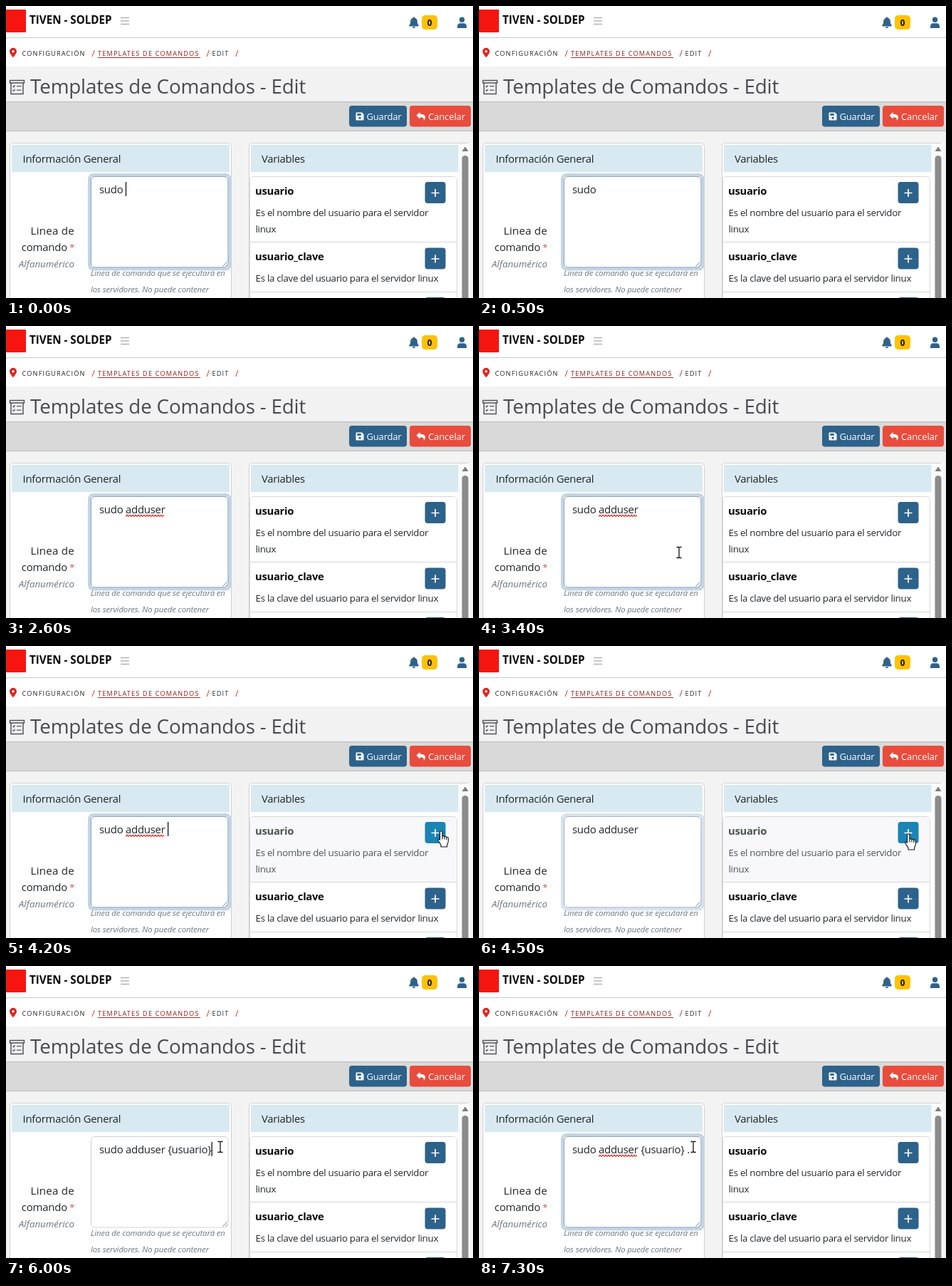
An HTML page for the animation above (8000 ms loop, 656 px wide and 410 px high).

```html
<!DOCTYPE html>
<html lang="es">
<head>
<meta charset="utf-8">
<title>Templates de Comandos</title>
<style>
  html, body { margin: 0; width: 100%; height: 100%; overflow: hidden; background: #f3f3f3; }
  svg { display: block; width: 656px; height: 410px; }
  text { font-family: "Open Sans", "Noto Sans", sans-serif; fill: #212529; white-space: pre; }
  .bold { font-weight: 700; fill: #0b0b0c; }
  .brand { font-size: 15.2px; }
  .crumb { font-size: 9.2px; letter-spacing: 1.15px; }
  .link { fill: #8c1d18; }
  .slash { font-size: 12px; fill: #d9301f; }
  .title { font-size: 27.8px; letter-spacing: -.2px; fill: #4a4a4f; }
  .btn { font-size: 13px; letter-spacing: -.18px; fill: #fff; }
  .head { font-size: 14.8px; letter-spacing: -.22px; }
  .name { font-size: 14.8px; letter-spacing: -.3px; }
  .desc { font-size: 13.3px; letter-spacing: -.27px; }
  .cmd { font-size: 15px; letter-spacing: -.3px; }
  .hint { font-size: 11.4px; letter-spacing: -.1px; font-style: italic; fill: #6c757d; }
  .end { text-anchor: end; }
  .hover text { fill: #4d5358; }
</style>
</head>
<body>
<svg viewBox="0 0 656 410">
  <defs>
    <g id="plus">
      <rect width="29" height="30" rx="4"/>
      <path d="M9 15.5h11M14.5 10v11" stroke="#fff" stroke-width="1.7"/>
    </g>
  </defs>

  <!-- top bar -->
  <rect width="656" height="85" fill="#fff"/>
  <path d="M0 44.5h656" stroke="#c9c9cb"/>
  <rect y="5" width="28" height="32" fill="#f5160f"/>
  <text class="bold brand" x="33" y="25">TIVEN - SOLDEP</text>
  <path d="M161 16.5h12M161 21h12M161 25.5h12" stroke="#b4b4b4" stroke-width="1.4"/>
  <g fill="#2d628b">
    <path d="M573 15.5c.8 0 1.2.5 1.2 1.2 2.2.5 3.6 2.300 3.600 4.800 0 3 .7 4.200 1.700 5.300.6.800.2 1.700-.700 1.700h-11.600c-.9 0-1.300-.9-.7-1.700 1-1.100 1.700-2.300 1.700-5.300 0-2.500 1.400-4.300 3.600-4.800 0-.7.4-1.200 1.200-1.200zM571 29.300h4a2 2 0 0 1-4 0z"/>
    <circle cx="640.500" cy="19.300" r="3.700"/>
    <path d="M634 31v-2.500c0-2.600 1.700-4.200 4.200-4.200h4.600c2.500 0 4.200 1.600 4.200 4.200V31z"/>
  </g>
  <rect x="584" y="13" width="22" height="20" rx="5" fill="#ffc107"/>
  <text class="bold" x="595" y="27.500" font-size="11.5" text-anchor="middle">0</text>

  <!-- breadcrumb -->
  <path d="M10 72.500C7 68.500 5 66.300 5 63.800a5 5 0 0 1 10 0c0 2.500-2 4.700-5 8.700z" fill="#e0261b"/>
  <circle cx="10" cy="63.800" r="1.700" fill="#fff"/>
  <text class="crumb" x="22.500" y="70">CONFIGURACIÓN</text>
  <text class="slash" x="120.500" y="71">/</text>
  <text class="crumb link" x="129" y="70">TEMPLATES DE COMANDOS</text>
  <path d="M129 72.500h144" stroke="#a8302a"/>
  <text class="slash" x="281.500" y="71">/</text>
  <text class="crumb" x="289.500" y="70">EDIT</text>
  <text class="slash" x="322" y="71">/</text>

  <!-- title -->
  <rect y="85" width="656" height="49" fill="#f2f2f3"/>
  <g fill="none" stroke="#55555a" stroke-width="1.500">
    <path d="M5.500 108v-3.500h20v3.500zM7 108v15.500h17V108"/>
    <path d="M9.500 112.500l1.200 1.200 2-2.400M9.500 118l1.200 1.200 2-2.400M15 112.700h6.500M15 118.200h6.500" stroke-width="1.300"/>
  </g>
  <text class="title" x="34" y="123">Templates de Comandos - Edit</text>

  <!-- toolbar -->
  <rect y="134" width="656" height="42" fill="#d9d9d9"/>
  <path d="M0 134.500h656M0 175.500h656" stroke="#bcbcbc"/>
  <rect x="482" y="140" width="81" height="29.500" rx="4" fill="#2d628b"/>
  <rect x="567" y="140" width="86" height="29.500" rx="4" fill="#e74c3c"/>
  <path d="M492.500 149.500h7.500l2.500 2.500v7.500a1 1 0 0 1-1 1h-9a1 1 0 0 1-1-1v-9a1 1 0 0 1 1-1z" fill="#fff"/>
  <path d="M493.300 151h5.500v2.800h-5.500z" fill="#2d628b"/>
  <circle cx="497" cy="157.200" r="1.600" fill="#2d628b"/>
  <text class="btn" x="506.500" y="160">Guardar</text>
  <path d="M576.500 153.500l5-4.500v2.700c4.500 0 7.500 1.200 7.500 4.800 0 1.800-1 3.300-2.300 4.300.8-3.300-.7-4.600-5.200-4.600v2.500z" fill="#fff"/>
  <text class="btn" x="593" y="160" style="letter-spacing:-.1px">Cancelar</text>

  <!-- left card -->
  <rect x="5.500" y="192.500" width="311" height="240" rx="5" fill="#fff" stroke="#cfcfd3"/>
  <rect x="8" y="195" width="306" height="38" fill="#d8e9f2"/>
  <text class="head" x="23.500" y="219.500">Información General</text>
  <text class="end" x="96" y="320.500" style="font-size:15.2px;letter-spacing:.2px">Linea de</text>
  <text class="end" x="86" y="343.500" style="font-size:15px;letter-spacing:-.25px">comando</text>
  <text class="end" x="96.500" y="344" style="font-size:13px;fill:#d9534f">*</text>
  <text class="hint end" x="96" y="367" style="font-size:13.300px;letter-spacing:0">Alfanumérico</text>
  <text class="hint" x="119" y="379">Linea de comando que se ejecutará en</text>
  <text class="hint" x="119" y="402">los servidores. No puede contener</text>

  <!-- text area -->
  <rect id="glow" x="117" y="237" width="197.500" height="132.500" rx="6" fill="none" stroke="#c3d5e5" stroke-width="4"/>
  <rect x="119.500" y="239.500" width="192.500" height="127.500" rx="5" fill="#fff" stroke="#cdd1d6"/>
  <rect id="rim" x="119.500" y="239.500" width="192.500" height="127.500" rx="5" fill="none" stroke="#8aa9c6"/>
  <path d="M304.500 365.500l6-6M308.500 365.500l2-2" stroke="#777" stroke-width=".9"/>
  <text class="cmd" id="cmd" x="131" y="263"></text>
  <path id="wave" fill="none" stroke="#e23b3b" stroke-width="1.100"/>
  <path id="caret" d="M0 247v20" stroke="#111" stroke-width="1.300"/>

  <!-- right card -->
  <path d="M341.500 410V197.500a5 5 0 0 1 5-5H651.500V410z" fill="#fff"/>
  <path d="M341.500 410V197.500a5 5 0 0 1 5-5H647a5 5 0 0 1 4.500 4" fill="none" stroke="#cfcfd3"/>
  <rect x="344" y="195" width="291.500" height="38" fill="#d8e9f2"/>
  <text class="head" x="359" y="219.500" style="letter-spacing:-.24px">Variables</text>
  <rect x="637" y="193" width="15" height="217" fill="#fafafa"/>
  <path d="M640.500 204l4.500-6.500 4.500 6.500z" fill="#7d7d7d"/>
  <rect x="640.500" y="210" width="9" height="230" rx="4.500" fill="#8b8b8b"/>

  <rect x="342.500" y="239.500" width="291" height="200" rx="5" fill="#fff" stroke="#d6d7d9"/>
  <g id="row">
    <path id="rowBg" d="M343 331V245a5 5 0 0 1 5-5H628a5 5 0 0 1 5 5V331z"/>
    <text class="bold name" x="350" y="264.500">usuario</text>
    <text class="desc" x="350.500" y="294.500">Es el nombre del usuario para el servidor</text>
    <text class="desc" x="350.500" y="317.500">linux</text>
    <use id="add" href="#plus" x="588.500" y="247"/>
  </g>
  <path d="M342 331.500h292M342 401.500h292" stroke="#d6d7d9"/>
  <text class="bold name" x="350" y="357">usuario_clave</text>
  <text class="desc" x="350.500" y="387">Es la clave del usuario para el servidor linux</text>
  <g fill="#2d628b">
    <use href="#plus" x="588.500" y="339.500"/>
    <use href="#plus" x="588.500" y="409"/>
  </g>

  <!-- pointer -->
  <g id="pointer" stroke-linejoin="round">
    <path id="beam" d="M-3.500-7.500h2.500L0-6.800l1-.7h2.500M0-6.800V6.800M-3.500 7.500h2.500L0 6.800l1 .7h2.500" fill="none" stroke="#111" stroke-width="1.300"/>
    <path id="arrow" d="M0 0v15.500l3.600-3.400 2.500 5.700 2.400-1-2.500-5.600h5z" fill="#fff" stroke="#111"/>
    <path id="hand" d="M-1.500 1.500a1.700 1.700 0 0 1 3.400 0v6a1.600 1.600 0 0 1 3 .3 1.600 1.600 0 0 1 2.800.8 1.600 1.600 0 0 1 2.600 1.200v4.200c0 2.500-1.500 4-1.800 5.500v2.500H0v-2.500c-.8-1.800-2.800-4-4-6.500-.9-2 1-2.800 2.500-.6zM1.900 7.500v4M4.900 8v3.500M7.700 9v3" fill="#fff" stroke="#111" stroke-width="1.100"/>
  </g>
</svg>

<script>
const LOOP = 8000, LEFT = 131, SPACING = -.3;
const $ = id => document.getElementById(id);

const texts = [
  [0, 'sudo '], [1000, 'sudo a'], [1150, 'sudo ad'], [1300, 'sudo add'],
  [1400, 'sudo addu'], [1550, 'sudo addus'], [1600, 'sudo adduse'],
  [1700, 'sudo adduser'], [1750, 'sudo adduser '],
  [4550, 'sudo adduser {usuario}'], [6500, 'sudo adduser {usuario} '],
  [7100, 'sudo adduser {usuario} .']
];
const caretOn = [[0, 300], [800, 2250], [2700, 3200], [3750, 4250], [5950, 6450], [6500, 7300]];
const waveOn = [[1950, 4500], [6600, LOOP]];
const path = [
  [3000, 281, 318], [3850, 281, 318], [4180, 611, 260], [4250, 611, 260],
  [4450, 603, 264], [4800, 603, 264], [5500, 301, 254], [LOOP, 301, 254]
];

const within = (spans, t) => spans.some(([a, b]) => t >= a && t < b);
const ramp = (t, start, length) => Math.min(1, Math.max(0, (t - start) / length));
const show = (el, on) => el.setAttribute('visibility', on ? 'visible' : 'hidden');

const pen = document.createElement('canvas').getContext('2d');
pen.font = '15px "Open Sans", "Noto Sans", sans-serif';
const widthOf = s => pen.measureText(s).width + s.length * SPACING;

function wavePath() {
  const from = LEFT + widthOf('sudo '), to = LEFT + widthOf('sudo adduser');
  let d = '';
  for (let x = from, i = 0; x <= to; x += 2, i++) {
    d += (i ? 'L' : 'M') + x.toFixed(1) + ' ' + (i % 2 ? 265.2 : 267.6);
  }
  return d;
}
$('wave').setAttribute('d', wavePath());

function pointerAt(t) {
  const i = path.findIndex(p => p[0] > t);
  if (i < 1) return null;
  const [t0, x0, y0] = path[i - 1], [t1, x1, y1] = path[i];
  const p = (t - t0) / (t1 - t0), k = p * p * (3 - 2 * p);
  return [x0 + (x1 - x0) * k, y0 + (y1 - y0) * k];
}

function drawPointer(t) {
  const pos = pointerAt(t);
  const [x, y] = pos || [0, 0];
  const overRow = x > 342 && x < 634 && y > 240 && y < 331;
  const overAdd = overRow && x > 588 && x < 618 && y > 247 && y < 277;
  const overArea = x > 119 && x < 313 && y > 239 && y < 367;
  $('pointer').setAttribute('transform', `translate(${x} ${y})`);
  show($('beam'), pos && overArea);
  show($('hand'), pos && overAdd);
  show($('arrow'), pos && !overArea && !overAdd);
  $('row').setAttribute('class', overRow ? 'hover' : '');
  $('rowBg').setAttribute('fill', overRow ? '#f8f8fb' : '#fff');
  $('add').setAttribute('fill', overAdd ? '#1b84b2' : '#2d628b');
}

function render(t) {
  const value = texts.filter(k => k[0] <= t).pop()[1];
  $('cmd').textContent = value;
  $('caret').setAttribute('transform', `translate(${LEFT + widthOf(value) + .5} 0)`);
  show($('caret'), within(caretOn, t));
  show($('wave'), within(waveOn, t));
  const focus = 1 - ramp(t, 4450, 150) + ramp(t, 6020, 150);
  $('glow').setAttribute('opacity', focus);
  $('rim').setAttribute('opacity', focus);
  drawPointer(t);
}

const start = performance.now();
function tick() {
  render((performance.now() - start) % LOOP);
  requestAnimationFrame(tick);
}
tick();
</script>
</body>
</html>
```
